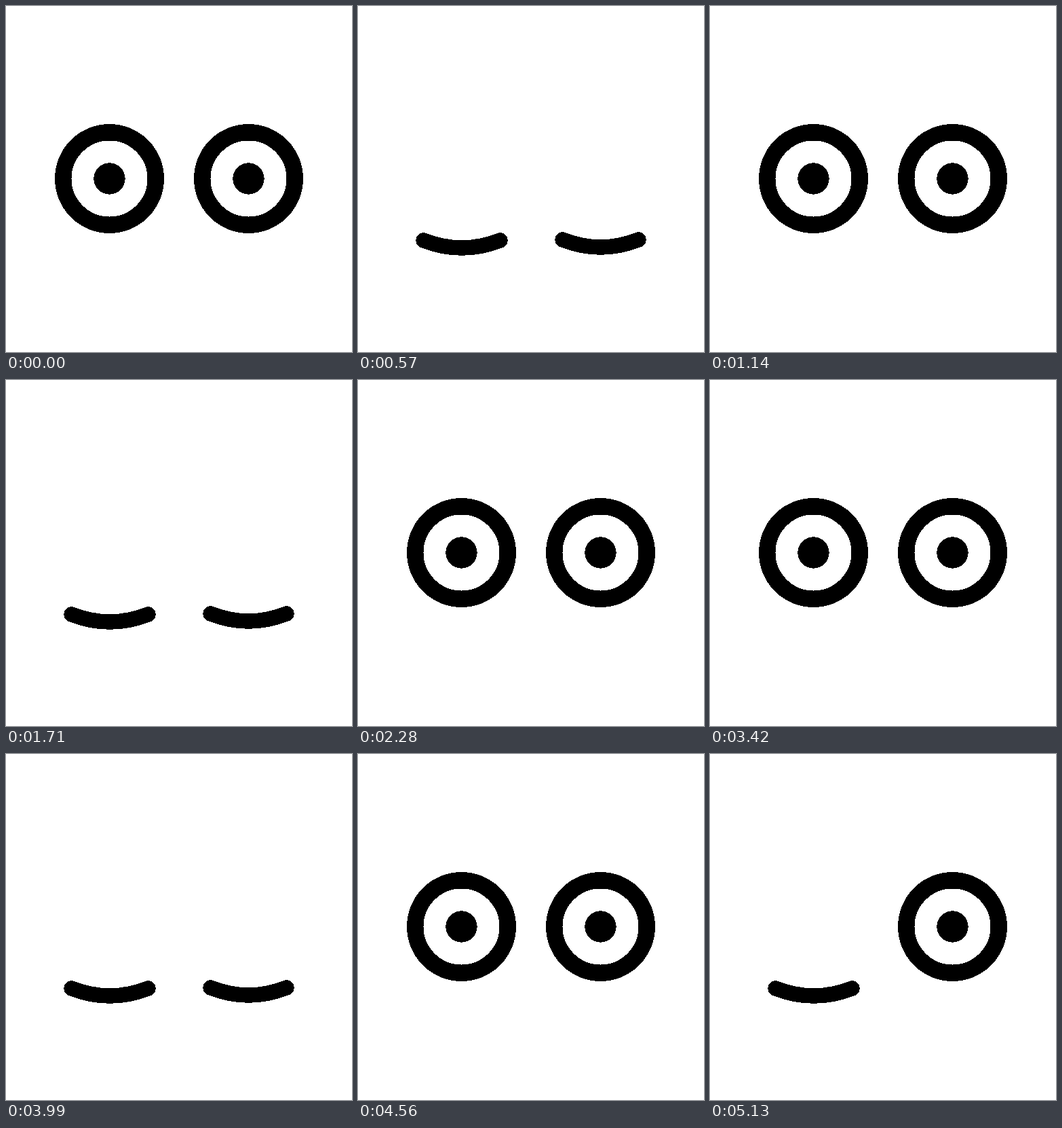
An HTML page for the animation above (5700 ms loop, 510 by 510 pixels).

```html
<!DOCTYPE html>
<html lang="en">
<head>
<meta charset="utf-8">
<title>Blinking eyes</title>
<style>
  html, body { margin: 0; width: 100%; height: 100%; overflow: hidden; background: #fff; }
  svg { display: block; width: 100%; height: 100%; shape-rendering: crispEdges; }
  .ring { fill: none; stroke: #000; stroke-width: 24.5; }
  .lid { fill: none; stroke: #000; stroke-width: 22.5; stroke-linecap: round; }
</style>
</head>
<body>
<svg viewBox="0 0 510 510">
  <defs>
    <g id="eye">
      <circle class="ring" r="68.25"/>
      <circle r="23.2"/>
    </g>
  </defs>
  <use id="leftOpen" href="#eye" x="152.5" y="254.5"/>
  <use id="rightOpen" href="#eye" x="357.5" y="254.5"/>
  <path id="leftClosed" class="lid" d="M96.5 345.5Q153 367.5 209.5 345.5"/>
  <path id="rightClosed" class="lid" d="M301.5 344.5Q357.5 366.5 413.5 344.5"/>
</svg>
<script>
  const STEP = 570;
  const STEPS = 10;

  function setEye(side, open) {
    document.getElementById(side + 'Open').style.display = open ? '' : 'none';
    document.getElementById(side + 'Closed').style.display = open ? 'none' : '';
  }

  function draw() {
    const step = Math.floor(performance.now() / STEP) % STEPS;
    const open = step % 2 === 0;
    setEye('left', open);
    setEye('right', open || step === STEPS - 1); // the last blink is a wink
    requestAnimationFrame(draw);
  }
  draw();
</script>
</body>
</html>
```
